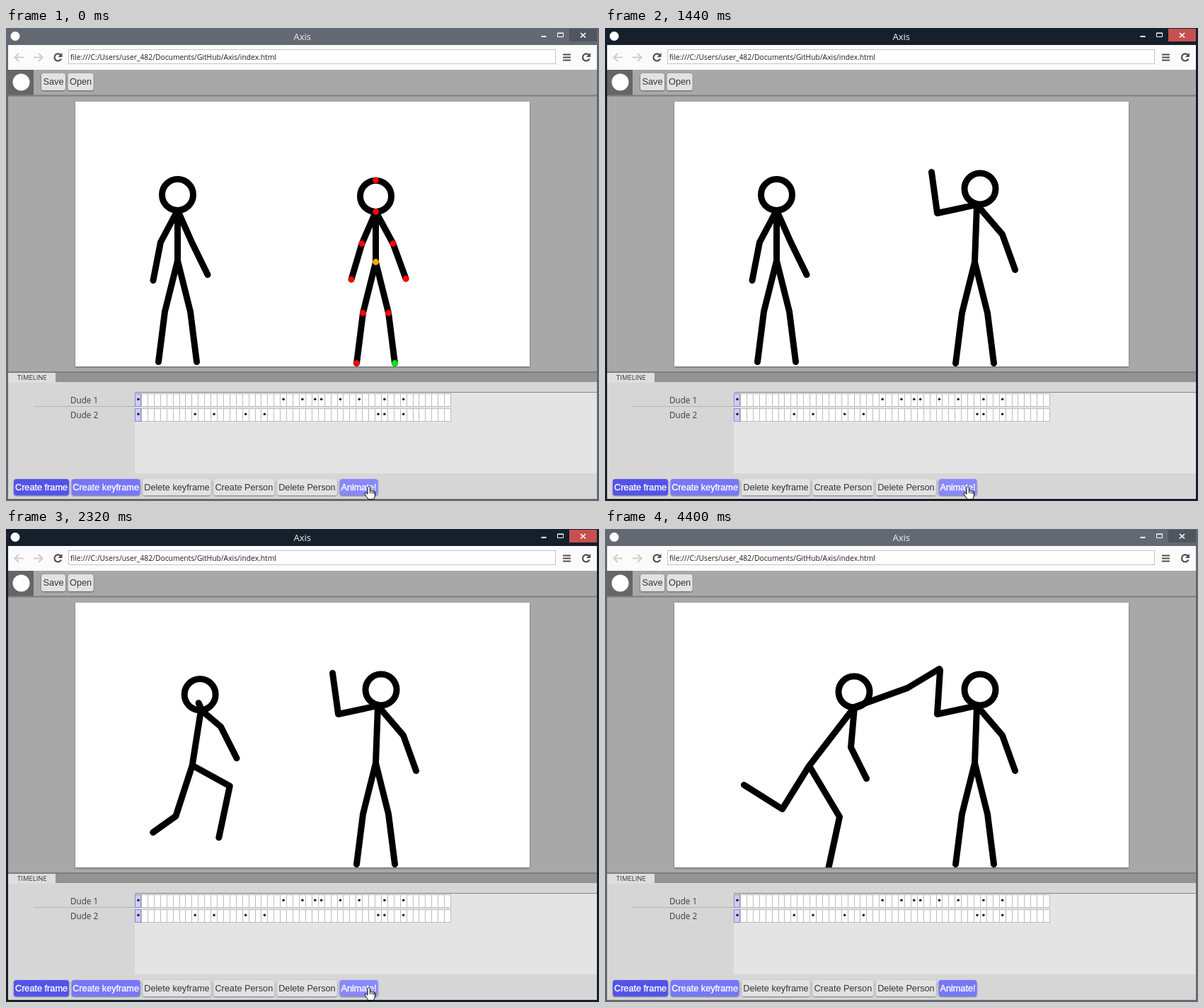
Recreate the animation shown at these times as an HTML page. Size 838 px wide and 668 px high, loop 4500 ms.

```html
<!DOCTYPE html>
<html lang="en">
<head>
<meta charset="utf-8">
<title>Axis</title>
<style>
  html, body { margin: 0; width: 100%; height: 100%; overflow: hidden; }
  svg { display: block; width: 838px; height: 668px; }
  text { font-family: "Open Sans", "Noto Sans", sans-serif; }
  .button text { font: 12.7px "Liberation Sans", Arial, sans-serif; text-anchor: middle; }
  .limbs { fill: none; stroke: #000; stroke-width: 9; stroke-linecap: round; stroke-linejoin: round; }
  .icon { fill: none; stroke: #505050; stroke-width: 2.2; }
  .faint { stroke: #cfcfcf; }
</style>
</head>
<body>
<svg viewBox="0 0 838 668">
  <defs>
    <clipPath id="stageClip"><rect x="98" y="104" width="642" height="374"/></clipPath>
    <filter id="shade" x="-5%" y="-5%" width="110%" height="112%">
      <feDropShadow dx="0" dy="1" stdDeviation="1.2" flood-opacity=".45"/>
    </filter>
  </defs>

  <!-- window frame -->
  <rect id="frame" width="838" height="668"/>
  <rect id="close" x="796" y="1" width="39" height="18"/>
  <circle cx="13" cy="11.5" r="6.5" fill="#fff"/>
  <text x="406.5" y="17" font-size="13" fill="#f2f2f2">Axis</text>
  <g fill="none" stroke="#fff">
    <path d="M756.5 12h7" stroke-width="2"/>
    <path d="M779.5 7.5h8v5h-8zM779 7h9"/>
    <path d="M812 7l7 6.5M819 7l-7 6.5" stroke-width="1.7"/>
  </g>

  <!-- browser bar -->
  <rect x="3" y="24" width="832" height="35" fill="#fbfbfb"/>
  <path class="icon faint" d="M25 41.5H13M18 36l-5.5 5.5 5.5 5.5M39 41.5h12M46 36l5.5 5.5-5.5 5.5"/>
  <g id="reload">
    <path class="icon" d="M77.5 38.5A5 5 0 1 0 78 43.5"/>
    <path d="M79.5 35v6h-6z" fill="#505050"/>
  </g>
  <use href="#reload" x="746.5"/>
  <path class="icon" d="M787 37.5h11M787 41.5h11M787 45.5h11"/>
  <rect x="88.5" y="30.5" width="688" height="20" fill="#fff" stroke="#c4c4c4"/>
  <text x="91" y="45" font-size="10.3" fill="#221a22">file:///C:/Users/user_482/Documents/GitHub/Axis/index.html</text>

  <!-- workspace -->
  <rect x="3" y="59" width="832" height="428" fill="#a8a8a8"/>
  <rect x="3" y="59" width="36" height="36" fill="#666"/>
  <circle cx="21.5" cy="76.5" r="12" fill="#fff"/>
  <path d="M3 95.5h832M3 486h832" stroke="#7e7e7e" stroke-width="2"/>
  <rect x="98" y="104" width="642" height="374" fill="#fff" filter="url(#shade)"/>
  <g clip-path="url(#stageClip)"><g id="people" transform="translate(.5 .5)"></g></g>

  <!-- timeline -->
  <rect x="3" y="487" width="832" height="14" fill="#939393"/>
  <rect x="3" y="500" width="832" height="165" fill="#d6d6d6"/>
  <rect x="3" y="487" width="67" height="14" fill="#dedede"/>
  <text x="16" y="497" font-size="9.5" fill="#333">TIMELINE</text>
  <rect x="182" y="514" width="653" height="115" fill="#e4e4e4"/>
  <path d="M182 514.5h653" stroke="#858585"/>
  <path d="M39 534.5h143" stroke="#b4b4b4"/>
  <g id="rows"></g>
  <g id="buttons"></g>

  <g id="hand" fill="#fff" stroke="#000" stroke-linejoin="round">
    <path d="M511 658V648.5q1.7-2.5 3.4 0V653q1.5-1 2.8.5q1.5-.7 2.5.8q1.7-.3 1.8 1.7V660q-.5 3-2 5.5h-7.5q-2-3-4.5-6.5q-1.2-2.2.5-2.7q1.5 0 3 2z"/>
    <path d="M514.4 653v4M517.2 654v3.5M519.7 655v3"/>
  </g>
  <path id="arrow" d="M0 0V14L3.3 11 5.6 16.2 8 15.2 5.7 10.2H10z" fill="#fff" stroke="#000"/>
</svg>

<script>
const LOOP = 4500, START = 500, FRAME = 46.8, LAST_FRAME = 42;
const $ = id => document.getElementById(id);

function add(parent, tag, attrs, text) {
  const node = document.createElementNS('http://www.w3.org/2000/svg', tag);
  for (const name in attrs) node.setAttribute(name, attrs[name]);
  if (text) node.textContent = text;
  return parent.appendChild(node);
}

const show = (node, on) => node.setAttribute('visibility', on ? 'visible' : 'hidden');
const mix = (a, b, k) => a.map((v, i) => v + (b[i] - v) * k);
const rgb = c => `rgb(${c.map(Math.round)})`;

// Controls
const GREY = '#e2e2e2', BLUE = '#7777fa', HOVER = '#8888ff';

function buttonRow(x, y, height, buttons) {
  for (const [label, width, fill = GREY] of buttons) {
    const g = add($('buttons'), 'g', { class: 'button' });
    add(g, 'rect', { x, y, width, height, rx: 3.5, fill, filter: 'url(#shade)' });
    const ink = fill === GREY ? { fill: '#333' } : { fill: '#fff', stroke: '#fff', 'stroke-width': .35 };
    add(g, 'text', { x: x + width / 2, y: y + 16, ...ink }, label);
    x += width + 3.6;
  }
}
buttonRow(50, 64, 24, [['Save', 34], ['Open', 36]]);
buttonRow(11, 637, 23, [
  ['Create frame', 78, '#5252ea'], ['Create keyframe', 97, BLUE], ['Delete keyframe', 96.5],
  ['Create Person', 86], ['Delete Person', 85], ['Animate!', 54, HOVER]
]);
const animateBox = $('buttons').lastChild.firstChild;

function timelineRow(label, y, keys) {
  const rows = $('rows'), pitch = 8.92;
  add(rows, 'text', { x: 91, y: y + 14, 'font-size': 11.7, fill: '#3c3c3c' }, label);
  for (let i = 49; i >= 0; i--) {
    add(rows, 'rect', {
      x: 182.5 + Math.round(i * pitch), y: y + .5, width: i ? 9 : 8, height: 18,
      fill: i ? '#fff' : '#cdcdfa', stroke: i ? '#bdbdbd' : '#8c8cc4'
    });
  }
  for (const { frame } of keys) add(rows, 'circle', { cx: 187 + frame * pitch, cy: y + 8.3, r: 1.8, fill: '#222' });
}

// Poses
const mixPose = (a, b, k) => Object.fromEntries(
  Object.keys(a).map(joint => [joint, mix(a[joint], b[joint], k)]));

function stand(x, y, elbowShift, handTilt) {
  const pose = { head: [x, y - 93], neck: [x, y - 71], hip: [x, y] };
  for (const [side, s] of [['left', -1], ['right', 1]]) {
    pose[side + 'Elbow'] = [x + 22 * s + elbowShift, y - 26];
    pose[side + 'Hand'] = [x + 38.5 * s + 4, y + 24 - handTilt * s];
    pose[side + 'Knee'] = [x + 18 * s, y + 72];
    pose[side + 'Foot'] = [x + 27 * s, y + 143];
  }
  return pose;
}

// Moves everything above the legs; shift(joint, point) gives the offset
function moveUpper(pose, shift) {
  return Object.fromEntries(Object.entries(pose).map(([joint, [x, y]]) => {
    if (/hip|Knee|Foot/.test(joint)) return [joint, [x, y]];
    const [dx, dy] = shift(joint, y);
    return [joint, [x + dx, y + dy]];
  }));
}

const stand1 = stand(242, 328, -2, 4);
const windUp = {
  head: [219, 236], neck: [221, 258], hip: [245, 333],
  leftElbow: [170, 277], leftHand: [131, 279], rightElbow: [272, 258], rightHand: [295, 303],
  leftKnee: [232, 412], leftFoot: [215, 475], rightKnee: [305, 332], rightFoot: [290, 404]
};
const lunge = {
  head: [351.5, 229.5], neck: [352, 251], hip: [288, 334],
  leftElbow: [427, 224], leftHand: [472, 197], rightElbow: [347, 308], rightHand: [369, 352],
  leftKnee: [250, 395], leftFoot: [196, 361], rightKnee: [331, 406], rightFoot: [315, 480]
};
const stand2 = stand(522, 330, 2.5, .5);
const bow = moveUpper(stand2, (joint, y) =>
  [Math.min(-3, .118 * (y - 330)), joint.startsWith('left') ? 14 : 6.5].map(v => v * 3));
const wave = {
  ...stand2, head: [529.5, 226.5], neck: [525, 249],
  leftElbow: [469, 261], leftHand: [461, 203], rightElbow: [561, 291], rightHand: [579, 341]
};
const highFive = { ...wave, leftHand: [473, 199] };

const key = (frame, pose) => ({ frame, pose });
const wind = (frame, k) => key(frame, mixPose(stand1, windUp, k));
const keys1 = [
  wind(0, 0), wind(23, 0), wind(26, .15), wind(28, .45), wind(29, .65), wind(32, 1.3), wind(35, 1),
  key(39, mixPose(windUp, lunge, .55)), key(42, lunge)
];
const keys2 = [
  key(0, stand2), key(9, stand2), key(12, bow), key(17, moveUpper(wave, () => [1, -10])),
  key(20, wave), key(38, wave), key(39, moveUpper(wave, () => [16, 0])), key(42, highFive)
];
timelineRow('Dude 1', 516, keys1);
timelineRow('Dude 2', 537, keys2);

function poseAt(keys, frame) {
  const next = Math.max(1, keys.findIndex(k => k.frame >= frame));
  const a = keys[next - 1], b = keys[next];
  return mixPose(a.pose, b.pose, (frame - a.frame) / (b.frame - a.frame));
}

const LIMBS = [
  ['hip', 'neck'],
  ...['left', 'right'].flatMap(s => [['neck', s + 'Elbow', s + 'Hand'], ['hip', s + 'Knee', s + 'Foot']])
];

function makePerson() {
  const g = add($('people'), 'g', { class: 'limbs' });
  const head = add(g, 'circle', { r: 22 }), limbs = add(g, 'path', {});
  return pose => {
    head.setAttribute('cx', pose.head[0]);
    head.setAttribute('cy', pose.head[1]);
    limbs.setAttribute('d', LIMBS.map(l => 'M' + l.map(joint => pose[joint].join(' ')).join('L')).join(''));
  };
}
const draw1 = makePerson(), draw2 = makePerson();

const handles = add($('people'), 'g', {});
const handleColours = { hip: '#ffa500', rightFoot: '#00ee00' };
for (const [joint, [cx, y]] of Object.entries(stand2)) {
  const cy = joint === 'head' ? y - 22.5 : y;
  add(handles, 'circle', { cx, cy, r: 4.4, fill: handleColours[joint] || '#ff0000' });
}

function render() {
  const t = performance.now() % LOOP;
  const ended = t >= 4400;
  const frame = Math.min(LAST_FRAME, Math.floor((t - START) / FRAME));
  const playhead = Math.max(0, frame);

  // The window gains focus in three steps
  const focus = ended ? 0 : Math.max(0, Math.min(3, Math.floor((t - 200) / 100))) / 3;
  $('frame').setAttribute('fill', rgb(mix([99, 105, 115], [21, 32, 44], focus)));
  $('close').setAttribute('fill', rgb(mix([80, 86, 95], [199, 80, 80], focus)));
  animateBox.setAttribute('fill', ended ? BLUE : HOVER);

  draw1(poseAt(keys1, playhead));
  draw2(poseAt(keys2, playhead));
  show(handles, frame < 0);

  const step = Math.floor((t - 3490) / 52);
  show($('hand'), step < 0);
  show($('arrow'), step >= 0 && step < 5);
  $('arrow').setAttribute('transform', `translate(${562.5 + 43 * step} ${651.5 + 3 * step})`);
  requestAnimationFrame(render);
}
render();
</script>
</body>
</html>
```
